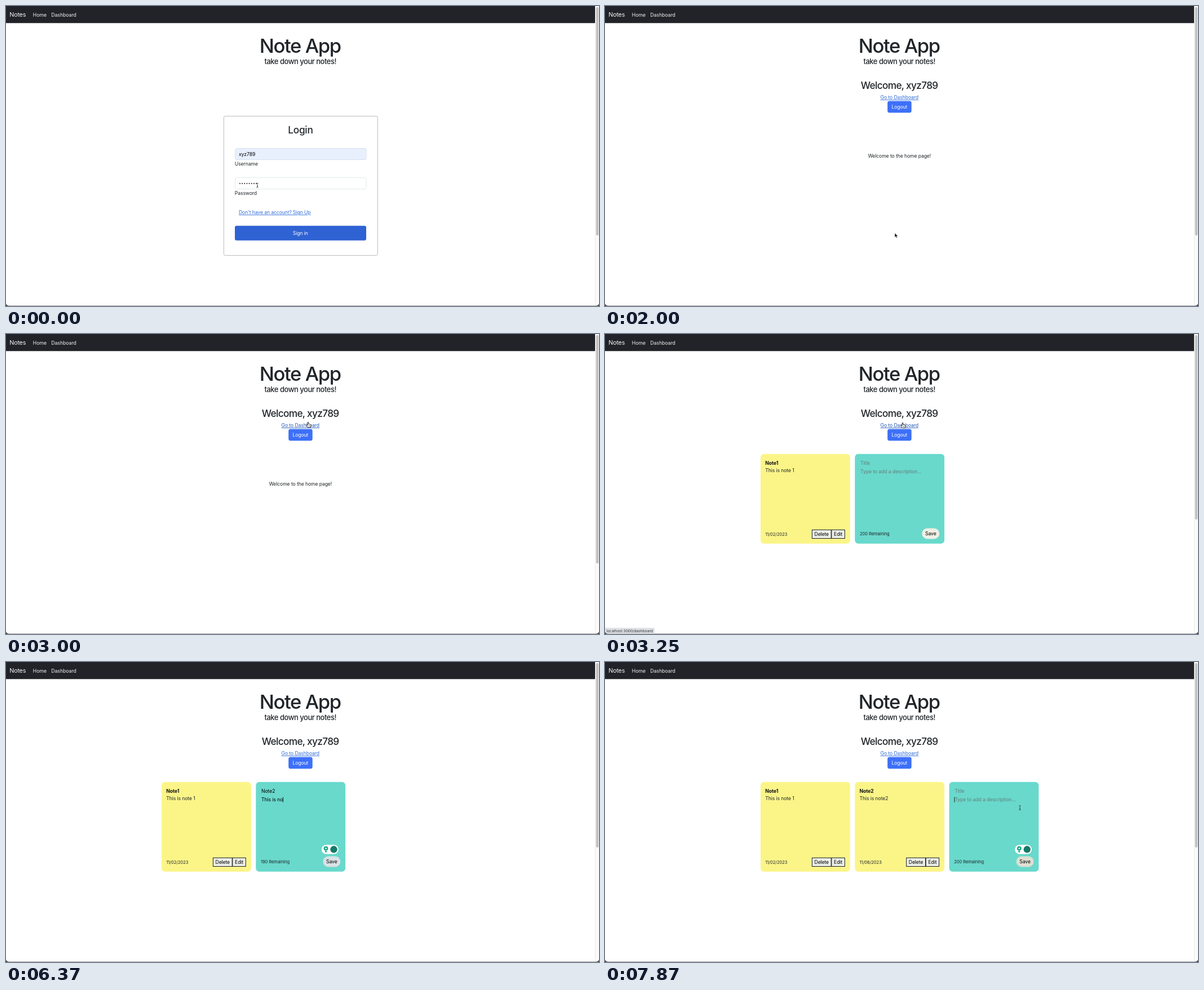
An HTML page that plays this animation: 1052x532 px, repeating every 8 s.

```html
<!DOCTYPE html>
<html lang="en">
<head>
<meta charset="utf-8">
<title>Note App</title>
<style>
  html, body { margin: 0; width: 100%; height: 100%; overflow: hidden; background: #fff; }
  svg { display: block; width: 1052px; height: 532px; }
  text {
    font: 400 8.64px Inter, Roboto, sans-serif;
    font-optical-sizing: none;
    letter-spacing: -.1px;
    fill: #212529;
    white-space: pre;
  }
  .mid { text-anchor: middle; }
  .nav { fill: #f4f5f6; letter-spacing: 0; }
  .brand { font-size: 10.8px; letter-spacing: -.25px; }
  .title { font-size: 34.6px; font-weight: 500; letter-spacing: -1.4px; }
  .sub { font-size: 12.96px; font-weight: 500; letter-spacing: -.46px; }
  .head { font-size: 17.3px; font-weight: 500; letter-spacing: -.7px; }
  .login { font-size: 17.3px; font-weight: 500; letter-spacing: -.25px; }
  .link { fill: #2f6bd8; text-decoration: underline; }
  .hot { fill: #2557b4; }
  .white { fill: #fff; }
  .bold { font-weight: 700; fill: #111; }
  .small { font-size: 7.56px; letter-spacing: -.05px; }
  .hint { fill: #667d7a; }
  .ink { fill: #000; }
  .status { font-size: 6.7px; letter-spacing: -.05px; fill: #333; }
</style>
</head>
<body>
<svg id="stage" viewBox="0 0 1052 532"></svg>
<script>
const LOOP = 8000, STEP = 125, USER = 'xyz789';
const stage = document.getElementById('stage');

const text = (x, y, s, cls = '', attr = '') =>
  `<text x="${x}" y="${y}" class="${cls}" ${attr}>${s}</text>`;
const box = (x, y, w, h, r, fill, stroke = 'none', attr = '') =>
  `<rect x="${x}" y="${y}" width="${w}" height="${h}" rx="${r}" fill="${fill}" stroke="${stroke}" ${attr}/>`;
const group = (id, body, attr = '') => `<g id="${id}" ${attr}>${body}</g>`;

const frame =
  box(0, 0, 1052, 532, 0, '#45454a') +
  box(0, -20, 1052, 551.4, 5, '#fff') +
  box(1045, 0, 7, 525, 0, '#fafafa') +
  box(1045, 0, .8, 531, 0, '#e6e6e6') +
  box(0, 0, 1045, 30.3, 0, '#212328') +
  box(1046.8, 2, 4.4, 405, 2.2, '#c1c1c1', 'none', 'id="thumb"') +
  text(6.3, 19.3, 'Notes', 'nav brand') +
  text(47.8, 18.5, 'Home', 'nav') +
  text(80.3, 18.5, 'Dashboard', 'nav') +
  text(521.8, 83, 'Note App', 'title mid') +
  text(522.2, 103, 'take down your notes!', 'sub mid');

const login =
  box(386.3, 195.3, 273, 247, 3, '#fff', '#b8b8ba') +
  text(522.4, 226, 'Login', 'login mid') +
  box(406.5, 252.5, 232.5, 20, 3, '#e8f0fe', '#d3dbe5', 'stroke-width=".8"') +
  text(413, 266.1, USER, 'ink') +
  text(405.8, 283.2, 'Username') +
  box(405.4, 303.2, 234.6, 22.6, 4, 'none', '#c2dbfe', 'id="ring" stroke-width="2.4"') +
  box(406.5, 304.3, 232.5, 20.4, 3, '#fff', '#d6e6e5', 'id="field" stroke-width=".8"') +
  Array.from({length: 8}, (_, i) =>
    `<circle cx="${415 + i * 4.15}" cy="314.8" r=".95" fill="#111"/>`).join('') +
  text(405.8, 334.6, 'Password') +
  text(413, 369.1, "Don't have an account? Sign Up", 'link') +
  box(406, 389.8, 233, 26, 3, '#2f62d3') +
  text(522.3, 405.8, 'Sign in', 'mid white');

const member =
  text(522.2, 146.7, 'Welcome, ' + USER, 'head mid') +
  text(522.3, 165.1, 'Go to Dashboard', 'link mid', 'id="dash"') +
  box(501.2, 168.6, 42.5, 20.6, 3.4, '#3d70f8') +
  text(522.3, 182.1, 'Logout', 'mid white');

const sheet = (x, color) => box(x, 212.8, 158.8, 158.9, 6, color);
const savedNote = (x, name, body, date) =>
  sheet(x, '#fbf588') +
  text(x + 8.3, 231.6, name, 'bold') +
  text(x + 8.3, 244.6, body) +
  text(x + 8.3, 357.8, date, 'small') +
  box(x + 91.4, 347.3, 33.8, 15.2, 0, '#ecefe9', '#1c1c1c') +
  box(x + 125.9, 347.3, 23.4, 15.2, 0, '#ecefe9', '#1c1c1c') +
  text(x + 108.3, 358.1, 'Delete', 'mid ink') +
  text(x + 137.6, 358.1, 'Edit', 'mid ink');

const helper =
  box(392.6, 324.2, 29.8, 16.3, 8.1, '#fff') +
  '<circle cx="400.2" cy="330.6" r="3.9" fill="#15a683"/>' +
  '<circle cx="400.2" cy="330.6" r="1.4" fill="#fff"/>' +
  box(398.6, 335, 3.2, 2.4, .8, '#15a683') +
  '<circle cx="414.2" cy="332.3" r="6.2" fill="#167a6a"/>';

const draft =
  sheet(276, '#69d9cc') +
  group('focus',
    box(284, 221.2, 142.6, 15.2, 2.6, 'none', '#fff', 'stroke-width=".8"') +
    box(284.9, 222.1, 140.8, 13.4, 1.8, 'none', '#1754b8', 'stroke-width="1.3"')) +
  text(285.8, 232.2, '', '', 'id="name"') +
  text(285.8, 247.4, '', '', 'id="body"') +
  box(0, 0, .8, 9.4, 0, '#000', 'none', 'id="caret"') +
  text(284.6, 356.8, '', 'small', 'id="left"') +
  box(395, 344.4, 31, 19, 9.5, '#efefe4', 'none', 'id="save"') +
  text(410.5, 357.1, 'Save', 'mid ink') +
  group('helper', helper);

const pointers =
  group('beam', '<path d="M-1.8-4Q0-4 0-2.8Q0-4 1.8-4M0-2.8V2.8M-1.8 4Q0 4 0 2.8Q0 4 1.8 4M-1 1.4H1" fill="none" stroke="#333" stroke-width=".8"/>') +
  group('arrow', '<path d="M0 0V8L1.9 6.3L3.2 9.2L4.6 8.6L3.3 5.8H5.7Z" fill="#111" stroke="#fff" stroke-width=".6"/>') +
  group('hand', '<path d="M-1.9 1V-4Q-1.8-5-1-5T-.2-4V-1.3L2.5-.9Q4-.5 4 1L3.3 4.7H-1.6L-4.4.9Q-4.6-.4-3.3-.1Z" fill="#fff" stroke="#222" stroke-width=".9" stroke-linejoin="round"/><path d="M-.1 1V3M1.6 1V3" stroke="#222" stroke-width=".6"/>');

stage.innerHTML = frame +
  group('login', login) +
  group('member', member) +
  text(522.3, 269.1, 'Welcome to the home page!', 'mid', 'id="home"') +
  group('board',
    savedNote(276, 'Note1', 'This is note 1', '11/02/2023') +
    group('second', savedNote(443.3, 'Note2', 'This is note2', '11/06/2023')) +
    group('draft', draft)) +
  group('status',
    '<path d="M0 521H86Q88 521 88 523V531.4H5Q0 531.4 0 526Z" fill="#dee1e6"/>' +
    text(2.6, 528.6, 'localhost:3000/dashboard', 'status')) +
  pointers;

const el = {};
stage.querySelectorAll('[id]').forEach(n => el[n.id] = n);
const set = (id, key, value) => el[id].setAttribute(key, value);
const show = (id, on) => set(id, 'visibility', on ? 'inherit' : 'hidden');
const clamp = (v, lo, hi) => Math.min(hi, Math.max(lo, v));

// time, x, y, pointer kind from that time on
const path = [
  [0, 446, 318, 'beam'], [750, 446, 318, 'beam'], [1000, 438, 334, 'arrow'],
  [1250, 429, 394, 'hand'], [1375, 440, 420, 'arrow'], [1625, 491, 432, 'arrow'],
  [1750, 512, 407, 'hand'], [2000, 514, 402.4, 'arrow'], [2250, 516, 385, 'arrow'],
  [2750, 530, 195, 'arrow'], [3000, 537, 161, 'hand'], [3250, 529, 162, 'hand'],
  [3500, 529, 166, 'hand'], [3625, 536, 190, 'arrow'], [3875, 520, 229, 'beam'],
  [4250, 520, 229, ''], [6625, 606, 262, 'arrow'], [6875, 590, 320, 'arrow'],
  [7000, 580, 353, 'hand'], [7250, 580, 353, 'hand'], [7375, 612, 340, 'arrow'],
  [7500, 680, 295, 'beam'], [7750, 736, 258.5, 'beam'], [LOOP, 736, 258.5, 'beam']
];

function movePointer(t) {
  const i = path.findIndex((p, n) => n + 1 === path.length || t < path[n + 1][0]);
  const a = path[i], b = path[i + 1] || a;
  const u = b === a ? 0 : (t - a[0]) / (b[0] - a[0]);
  for (const kind of ['beam', 'arrow', 'hand']) show(kind, a[3] === kind);
  if (a[3]) set(a[3], 'transform',
    `translate(${a[1] + (b[1] - a[1]) * u} ${a[2] + (b[2] - a[2]) * u})`);
}

function fill(id, value, hint) {
  el[id].textContent = value || hint;
  set(id, 'class', value ? 'ink' : 'hint');
}

function editDraft(t) {
  const saved = t >= 7250;
  const name = saved ? '' : 'Note2'.slice(0, t >= 5125 ? 5 : clamp(Math.floor((t - 4250) / STEP), 0, 4));
  const body = saved ? '' : 'This is note2'.slice(0, clamp(Math.floor((t - 5500) / 87.5), 0, 13));
  const inName = t >= 4000 && t < 5375;
  const inBody = t >= 5375 && t < 7125 || t >= 7750;
  fill('name', name, 'Title');
  fill('body', body, 'Type to add a description...');
  el.left.textContent = 200 - body.length + ' Remaining';
  set('draft', 'transform', `translate(${saved ? 334.6 : 167.3} 0)`);
  show('second', saved);
  show('focus', inName);
  show('helper', t >= 5500 && !saved || t >= 7750);
  set('save', 'fill', saved ? '#dedfd3' : t < 4000 ? '#efefe4' : '#d9e1e5');
  show('caret', inName || inBody);
  const typed = inName ? name : body;
  const width = typed ? el[inName ? 'name' : 'body'].getComputedTextLength() : -.8;
  set('caret', 'x', 285.8 + width);
  set('caret', 'y', inName ? 224.2 : 239.4);
}

function draw(time) {
  const t = Math.floor((time % LOOP + 5) / STEP) * STEP % LOOP;
  const signedIn = t >= 1875, board = t >= 3125;
  show('login', !signedIn);
  show('member', signedIn);
  show('home', signedIn && !board);
  show('board', board);
  show('status', t >= 3250 && t < 3750);
  set('ring', 'opacity', clamp(t / 375, 0, 1));
  set('field', 'stroke', t < 125 ? '#d6e6e5' : '#86b7fe');
  set('dash', 'class', 'link mid' + (t >= 3000 && t < 3625 ? ' hot' : ''));
  set('thumb', 'height', board ? 327 : 405);
  editDraft(t);
  movePointer(t);
}

const start = performance.now();
function tick() {
  draw(performance.now() - start);
  requestAnimationFrame(tick);
}
tick();
</script>
</body>
</html>
```
